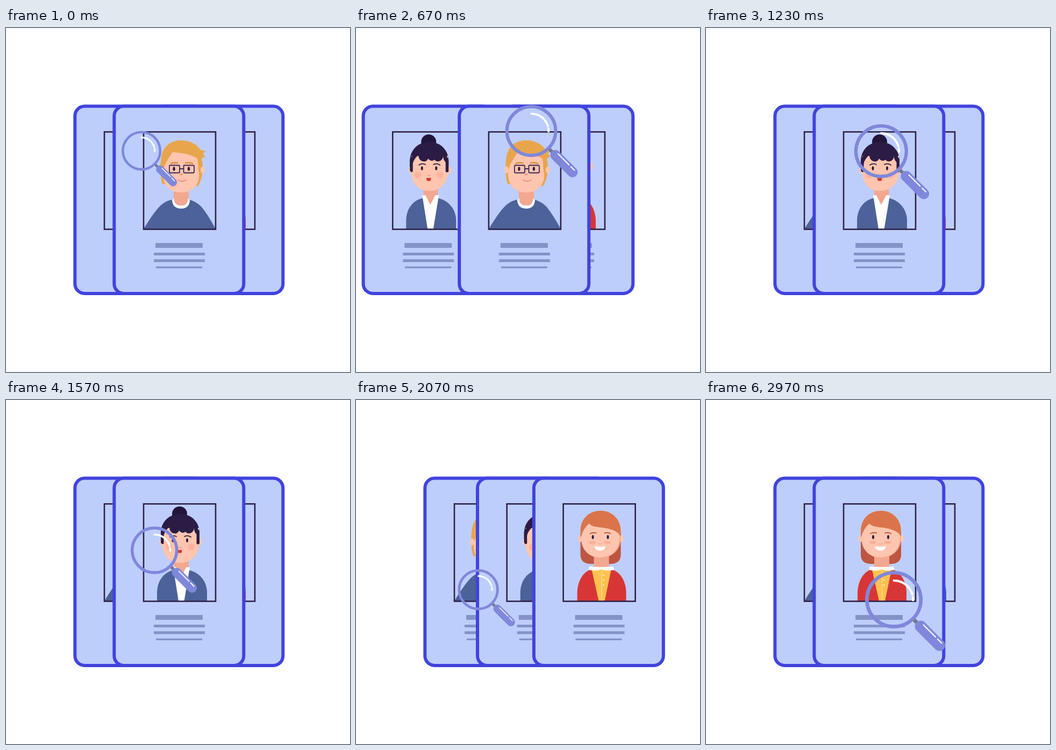
Animation, 640 px wide and 640 px high, one loop 3010 ms. Source, as an HTML page with a canvas:

```html
<!DOCTYPE html>
<html lang="en">
<head>
<meta charset="utf-8">
<title>Profile search</title>
<style>
html, body { margin: 0; width: 100%; height: 100%; overflow: hidden; background: #fff; }
canvas { display: block; width: 100vmin; height: 100vmin; }
</style>
</head>
<body>
<canvas id="stage" width="640" height="640"></canvas>
<script>
const ctx = document.getElementById('stage').getContext('2d');
const LOOP = 3010;
const SKIN = '#ffc5ae', SHADE = '#f4a78f', NAVY = '#4c6299', INK = '#2b1c45';

// ---- drawing helpers ----
function fill(color, d) {
  ctx.fillStyle = color;
  ctx.fill(new Path2D(d));
}

function line(color, width, d, cap = 'round') {
  ctx.strokeStyle = color;
  ctx.lineWidth = width;
  ctx.lineCap = cap;
  ctx.lineJoin = 'round';
  ctx.stroke(new Path2D(d));
}

function oval(color, x, y, rx, ry = rx) {
  ctx.fillStyle = color;
  ctx.beginPath();
  ctx.ellipse(x, y, rx, ry, 0, 0, Math.PI * 2);
  ctx.fill();
}

function pair(color, x1, x2, y, rx, ry) {
  oval(color, x1, y, rx, ry);
  oval(color, x2, y, rx, ry);
}

// ---- portraits, in the coordinates of the middle card ----
function man() {
  fill(SHADE, 'M312 296H340V328H312Z');
  fill(NAVY, 'M256 374Q277 339 290 328Q300 320 312 319H338Q352 321 363 332Q375 346 390 374Z');
  fill('#fff', 'M309 320L313 317Q313 330 326 330Q338 330 338 317L342 320Q341 336 326 336Q310 336 309 320Z');
  fill(SHADE, 'M313 316Q313 330 326 330Q338 330 338 316Z');
  fill('#e9a54c', 'M291 290C287 276 286 256 289 240C292 219 308 209 325 209C342 209 355 216 362 227L371 229L366 234L371 239L364 243C368 262 366 280 357 294Z');
  pair(SKIN, 289, 366, 264, 4, 6.5);
  fill(SKIN, 'M310 231C327 232 346 235 356 243C358 252 357 262 359 270C361 290 348 306 326 306C303 306 292 292 292 270C294 253 302 243 310 231Z');
  line('#dd9649', 3, 'M307 252Q313 250 319 251M334 251Q341 250 347 252');
  pair(INK, 312.5, 340, 262, 2.2, 3.8);
  line('#382959', 1.8, 'M305 255.5H321.5Q323 255.5 323 257V267.5Q323 269.5 321 269.5H306Q304 269.5 304 267.5V257Q304 255.5 305 255.5ZM331.5 255.5H348.5Q350 255.5 350 257V267.5Q350 269.5 348 269.5H332.5Q330.5 269.5 330.5 267.5V257Q330.5 255.5 331.5 255.5ZM323 262H330.5');
  fill('#f08c6d', 'M322.5 271H329.5Q328 274 326 274Q323.5 274 322.5 271Z');
  line('#e9785f', 1.5, 'M320 282.5Q327 288 335 282.5');
}

function woman() {
  oval('#21163a', 323, 212, 14);
  fill(INK, 'M288 266V248C288 226 304 212 324 212C345 212 360 227 360 248V266Z');
  pair(SKIN, 289.5, 361, 264, 4.2, 6.5);
  fill(SHADE, 'M313 294H340V330H313Z');
  fill(NAVY, 'M281 374V357C282 337 292 322 310 317H342C361 322 373 337 374 357V374Z');
  fill('#fff', 'M311 311L318 311L326 328L335 311L342 311L331.5 374H321Z');
  fill(SHADE, 'M314 305H338L326 329Z');
  fill(SKIN, 'M291 238H359V268C359 290 343 303 324 303C304 303 291 290 291 268Z');
  fill(INK, 'M288 265V245L300 226H350L360 245V267Q357 270 354.5 267V250Q349 244 350 236Q350 246 342 248Q337 249 334 245Q328 250 322 243Q319 250 312 248Q304 246 304 236Q295 244 293.5 252V267Q290 270 288 265Z');
  line(INK, 1.8, 'M305 255Q310 251 317 254M332 254Q338 251 344 255');
  pair(INK, 310.5, 337, 261, 2, 3.7);
  pair('#ffb39f', 303, 344, 273.5, 6.5, 6.2);
  line('#f39a81', 1.5, 'M321 274Q323 275.5 326 274');
  fill('#d9342f', 'M318.5 279L321 278.7L323 279.5L325 278.7L327.5 279L326.5 284.5H320Z');
}

function redhead() {
  fill('#bd5541', 'M288 248H363V289Q362 305 343 305H308Q289 305 288 289Z');
  pair(SKIN, 287.5, 364, 258, 4, 6.5);
  fill(SHADE, 'M313 286H341V316H313Z');
  fill('#d83636', 'M282 374V357C283 337 292 322 305 316H349C363 322 372 337 373 357V374Z');
  fill('#fdc24f', 'M309 316H345L333 374H322Z');
  line('#fff0c8', 0.8, 'M327.5 318V374');
  for (const y of [326, 335, 344]) oval('#fff3d5', 331, y, 1.3);
  fill('#fff', 'M305 309.5Q327 312 349 309.5L351 316Q339 319 327.5 315.5Q315 319 303 316Z');
  oval(SHADE, 326, 260, 36.5, 34);
  fill(SKIN, 'M290 250C294 236 300 230 307 228L361 246V254C361 279 345 293 324 293C304 293 290 278 290 260Z');
  fill('#db744a', 'M288 257V244C288 221 304 206 325.5 206C347 206 363 222 363 244V255C360 247 352 242 338 239C323 236 310 237 304 230C298 235 292 243 288 257Z');
  line('#bf5c42', 2, 'M306 248.5Q311 245.5 317 247.5M333 247.5Q339 245.5 344 248.5');
  pair(INK, 311, 339, 255, 2, 3.8);
  pair('#f8ae97', 310, 338, 265, 6.5, 2.7);
  line(SHADE, 1.4, 'M322 267Q325 269 328 267');
  fill('#fff', 'M314 272Q324.5 274 335 272Q333 280.5 324.5 280.5Q316 280.5 314 272Z');
}

function card(dx, portrait) {
  ctx.save();
  ctx.translate(dx, 0);
  ctx.beginPath();
  ctx.roundRect(201.3, 145.5, 241, 348.5, 18);
  ctx.fillStyle = '#bdcefc';
  ctx.fill();
  ctx.strokeStyle = '#4143de';
  ctx.lineWidth = 6;
  ctx.stroke();
  ctx.save();
  ctx.beginPath();
  ctx.rect(256, 193, 134, 181);
  ctx.clip();
  portrait();
  ctx.restore();
  ctx.strokeStyle = '#302048';
  ctx.lineWidth = 2.6;
  ctx.lineJoin = 'miter';
  ctx.strokeRect(256, 193.3, 134, 181.2);
  ctx.fillStyle = '#8393c8';
  ctx.fillRect(278, 400, 88, 9);
  ctx.fillRect(275, 418, 95, 5);
  ctx.fillRect(275, 430.3, 95, 5.2);
  ctx.fillRect(279, 443.6, 86, 3.4);
  ctx.restore();
}

// Drawn around a lens of outer radius 1
function glass(x, y, r) {
  ctx.save();
  ctx.translate(x, y);
  ctx.scale(r, r);
  line('#777880', 0.13, 'M.68 .68L.84 .84', 'butt');
  line('#7f88db', 0.4, 'M.93 .93L1.585 1.585');
  line('#fff', 0.042, 'M1.03 .88L1.45 1.3M1.52 1.37L1.66 1.51');
  const arc = (color, width, radius, from, to) => {
    ctx.beginPath();
    ctx.arc(0, 0, radius, from, to);
    ctx.strokeStyle = color;
    ctx.lineWidth = width;
    ctx.lineCap = 'round';
    ctx.stroke();
  };
  arc('#7f88db', 0.125, 0.9375, 0, Math.PI * 2);
  arc('#fff', 0.08, 0.665, -Math.PI / 2, -0.27);
  arc('#fff', 0.08, 0.665, -0.13, 0.03);
  ctx.restore();
}

// ---- motion ----
function ease(t, t0, t1, a, b) {
  const u = Math.min(1, Math.max(0, (t - t0) / (t1 - t0)));
  return a + (b - a) * u * u * (3 - 2 * u);
}

// Time, x, y along the path of the lens
const path = [
  [0, 252, 228.5], [430, 299, 205.7], [870, 347, 186.7], [1000, 359, 191],
  [1230, 326, 229], [1870, 238, 324], [2000, 225, 345], [2370, 284, 368],
  [2600, 314, 381], [2800, 337, 382], [2970, 349.5, 371.5], [3010, 351, 367]
];

function slope(i, k) {
  const a = path[Math.max(0, i - 1)], b = path[Math.min(path.length - 1, i + 1)], p = path[i];
  if (a === p || b === p) return (b[k] - a[k]) / (b[0] - a[0]);
  const h0 = p[0] - a[0], h1 = b[0] - p[0];
  return ((p[k] - a[k]) / h0 * h1 + (b[k] - p[k]) / h1 * h0) / (h0 + h1);
}

function along(t, k) {
  let i = 0;
  while (i < path.length - 2 && t >= path[i + 1][0]) i++;
  const a = path[i], b = path[i + 1], h = b[0] - a[0], u = (t - a[0]) / h, v = 1 - u;
  return v * v * (1 + 2 * u) * a[k] + u * u * (3 - 2 * u) * b[k]
    + h * u * v * (v * slope(i, k) - u * slope(i + 1, k));
}

// The lens swells and shrinks by turns, one second each
function lensSize(t) {
  const u = t / 1000 % 2;
  return 37 + 17 * (u < 1 ? u : 2 - u);
}

function draw(t) {
  const manX = ease(t, 530, 1170, 0, -73);
  const womanX = t < 700 ? ease(t, 535, 700, -73, -198)
    : t < 1860 ? ease(t, 700, 1170, -198, 0)
    : ease(t, 1860, 2400, 0, 73);
  const redX = t < 1860 ? ease(t, 1640, 1860, 73, 196) : ease(t, 1860, 2400, 196, 0);

  const m = () => card(manX, man);
  const w = () => card(womanX, woman);
  const r = () => card(redX, redhead);
  const order = t < 700 ? [r, w, m] : t < 1870 ? [r, m, w] : [m, w, r];

  ctx.clearRect(0, 0, 640, 640);
  for (const show of order) show();
  glass(along(t, 1), along(t, 2), lensSize(t));
}

const start = performance.now();
function tick() {
  draw((performance.now() - start) % LOOP);
  requestAnimationFrame(tick);
}
tick();
</script>
</body>
</html>
```
